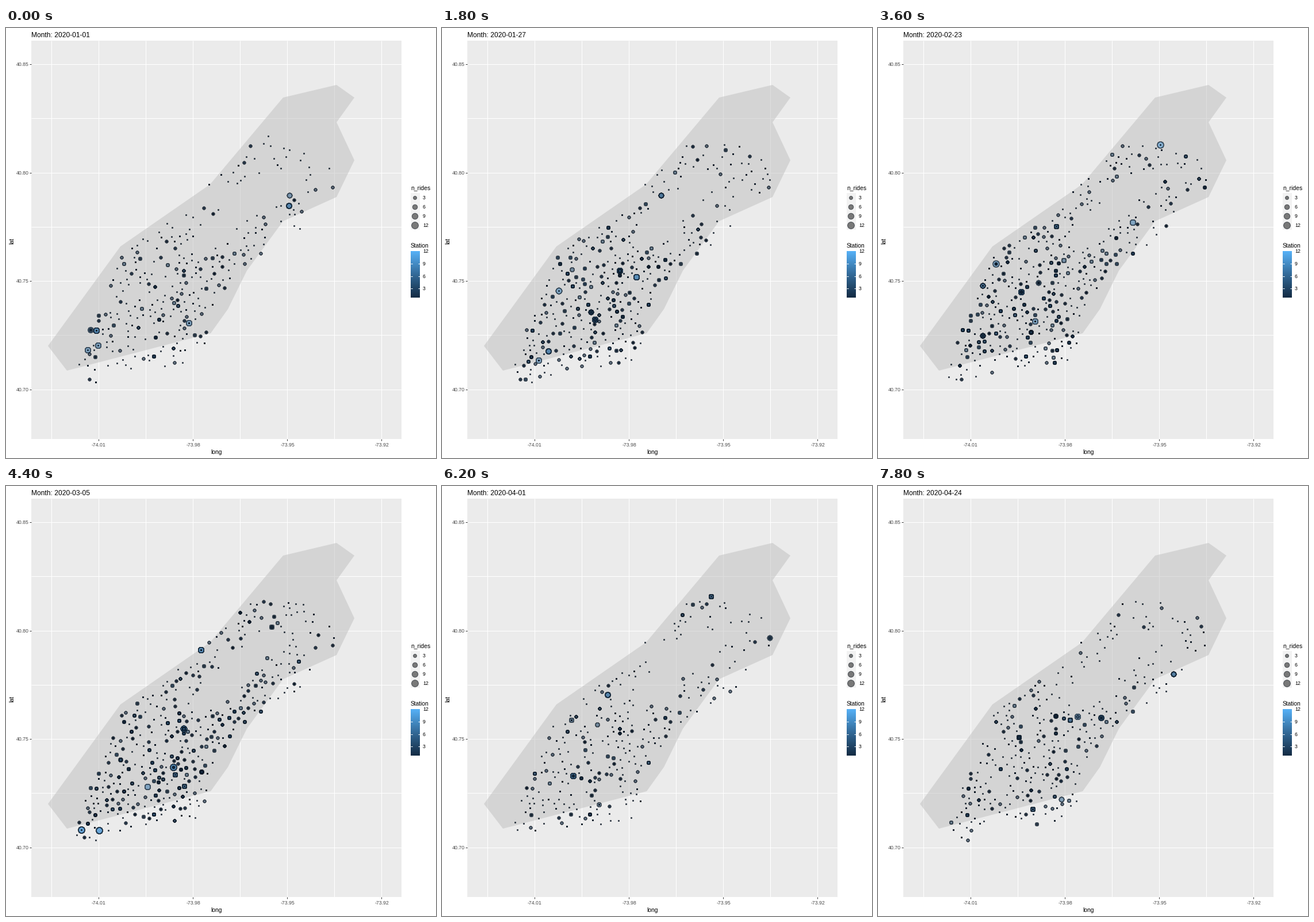
Animation of 748x748 px, one loop 8000 ms. Source, as a matplotlib script:

```python
import numpy as np
import matplotlib.pyplot as plt
from matplotlib.animation import FuncAnimation
from matplotlib.colors import LinearSegmentedColormap
from matplotlib.patches import Polygon, Rectangle
from matplotlib.path import Path

SIZE, FRAMES, STEP = 748, 40, 200
PX = 0.72                      # points per pixel at 100 dpi
DAYS_PER_FRAME = 2.945
plt.rcParams["font.family"] = "Liberation Sans"
BLUES = LinearSegmentedColormap.from_list("rides", ["#132B43", "#336A98", "#56B1F7"])

AREA = [(73, 553), (199, 380), (355, 272), (482, 121), (575, 99), (606, 121),
        (575, 164), (606, 230), (575, 294), (482, 336), (419, 422), (386, 489),
        (356, 531), (106, 596)]

# Outline of the station network, and the park left empty inside it
SHORE = Path([(123, 570), (170, 479), (173, 451), (200, 397), (318, 298), (375, 245),
              (432, 181), (528, 209), (552, 222), (582, 270), (537, 302), (508, 357),
              (430, 399), (375, 463), (350, 505), (346, 562), (328, 584), (201, 598),
              (149, 625), (123, 608)])
PARK = Path([(321, 371), (364, 382), (491, 264), (447, 254)])

# Stations that are often the busiest
HUBS = [(245, 437), (270, 488), (279, 443), (270, 415), (248, 471), (273, 476),
        (160, 552), (338, 433), (315, 368), (201, 399)]


def build_stations():
    """A jittered street grid clipped to the shore, and the demand at each stop."""
    rng = np.random.default_rng(12)
    spots = list(HUBS)
    avenue = np.array([131, -122]) / 179
    street = np.array([49, 14]) / 51
    for i in range(-10, 55):
        for j in range(-25, 26):
            p = (140, 590) + avenue * i * 12.2 + street * j * 12.8
            p = np.round(p + rng.uniform(-3.2, 3.2, 2))
            keep = rng.random() < (0.72 if p[1] < 340 else 1)
            if (keep and SHORE.contains_point(p) and not PARK.contains_point(p)
                    and min(np.hypot(*(p - q)) for q in spots) > 7.5):
                spots.append(p)
    spots = np.array(spots, float)
    y = spots[:, 1]
    demand = rng.gamma(2, 0.5, len(spots))
    demand *= np.interp(y, [250, 360, 430, 540, 600], [0.45, 0.7, 1.2, 1.2, 0.65])
    return spots, demand


STATIONS, DEMAND = build_stations()


def rides(frame):
    """Positions and ride counts of all points drawn in one frame."""
    rng = np.random.default_rng(700 + frame)
    busy = np.interp(frame, [0, 10, 22, 27, 39], [0.38, 0.62, 0.74, 0.33, 0.42])
    odds = DEMAND.copy()
    odds[:len(HUBS)] = 8
    top = rng.choice(len(STATIONS), int(4 + 10 * busy), False, odds / odds.sum())
    counts = rng.integers(4, 8 + int(5 * busy), len(top))
    big = np.column_stack([STATIONS[top], counts])
    parts = [np.repeat(big, rng.integers(1, 3, len(top)), axis=0)]
    for _ in range(3):
        n = np.minimum(rng.poisson(busy * DEMAND), 3)
        on = n > 0
        parts.append(np.column_stack([STATIONS[on], n[on]]))
    return np.vstack(parts)


def area(n):
    d = 1.5 + 10.4 * np.sqrt((np.asarray(n, float) - 1) / 11)
    return (d * PX) ** 2


fig = plt.figure(figsize=(7.48, 7.48), dpi=100, facecolor="white")
ax = fig.add_axes([0, 0, 1, 1])


def label(x, y, s, size, color="black", **kw):
    return ax.text(x, y, s, fontsize=size * PX, color=color, **kw)


def line(xs, ys, color, z=1):
    ax.plot(xs, ys, color=color, lw=PX, solid_capstyle="butt", zorder=z)


def box(x, y, w, h, color):
    ax.add_patch(Rectangle((x, y), w, h, fc=color, lw=0, zorder=0))


def row(y):
    return np.floor(y) + 0.5


# Panel, grid and axes
box(44, 22, 644, 693, "#EBEBEB")
for k in range(8):
    x = 79.5 + 82 * k
    line([x, x], [22, 715], "white")
for k in range(7):
    y = row(62.5 + 94.25 * k)
    line([44, 688], [y, y], "white")
for k in range(4):
    x, y = 161.5 + 164 * k, row(62.5 + 188.5 * k)
    line([x, x], [715, 718], "#333333")
    line([41, 44], [y, y], "#333333")
    label(x, 728, f"{-74.01 + 0.03 * k:.2f}", 8.8, "#4D4D4D", ha="center")
    label(39.5, y + 3.5, f"{40.85 - 0.05 * k:.2f}", 8.8, "#4D4D4D", ha="right")
label(366, 741, "long", 10.4, ha="center")
label(10.5, 370, "lat", 10.4, ha="center", va="center", rotation=90)
ax.add_patch(Polygon(AREA, fc="#BEBEBE", alpha=0.5, lw=0, zorder=2))

# Size legend
label(704, 281.5, "n_rides", 10.4)
box(704, 287, 16, 64, "#F2F2F2")
EDGE = (0, 0.03, 0.07, 0.55)
for k, n in enumerate((3, 6, 9, 12)):
    y = 294.5 + 16 * k
    ax.scatter([711.5], [y], s=area(n), fc=(0, 0, 0, 0.5), ec=EDGE, lw=PX,
               antialiased=False, zorder=3)
    label(725, y + 3.5, str(n), 8.8)

# Colour legend
label(704, 382, "Station", 10.2)
ax.imshow(np.linspace(1, 0, 160)[:, None], cmap=BLUES, extent=(704, 720, 469, 388),
          aspect="auto", zorder=1)
for n in (12, 9, 6, 3):
    y = row(467.5 - 80 * (n - 1) / 11)
    if n < 12:
        line([704, 707], [y, y], "white", 2)
        line([717, 720], [y, y], "white", 2)
    label(725, y + 3.5, str(n), 8.8)

title = label(44, 16, "", 12)
dots = ax.scatter([], [], ec=[EDGE], lw=PX, antialiased=False, zorder=4)
ax.set_xlim(0, SIZE)
ax.set_ylim(SIZE, 0)
ax.axis("off")


def update(frame):
    pts = rides(frame)
    n = pts[:, 2]
    dots.set_offsets(pts[:, :2] + 0.5)
    dots.set_sizes(area(n))
    dots.set_facecolors(BLUES((n - 1) / 11, alpha=0.55))
    day = np.datetime64("2020-01-01") + int(frame * DAYS_PER_FRAME)
    title.set_text(f"Month: {day}")
    return dots, title


anim = FuncAnimation(fig, update, frames=FRAMES, interval=STEP, repeat=True, repeat_delay=0)
plt.show()
```
